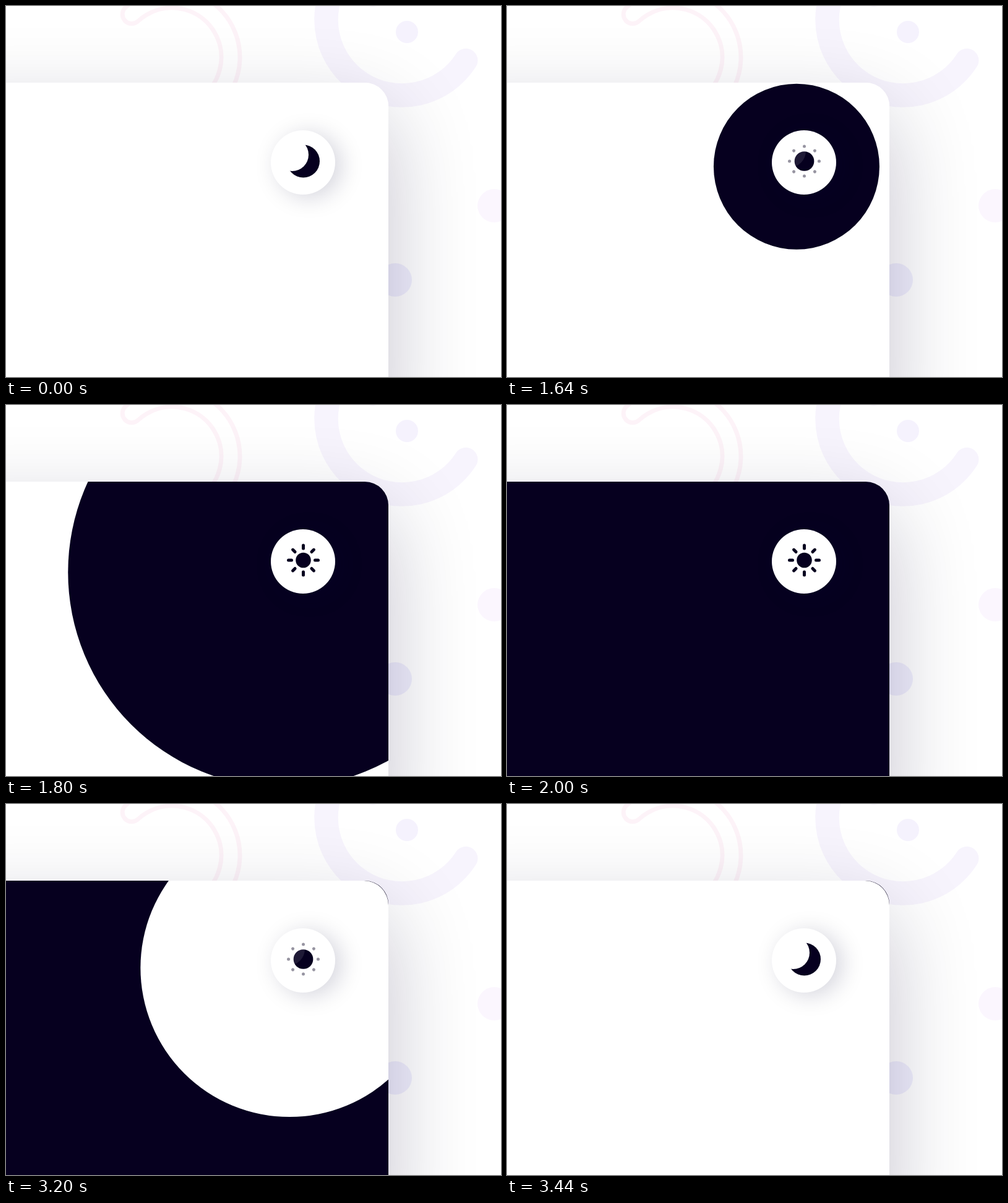
Animation of 800 by 600 pixels, one loop 3480 ms. Source, as an HTML page with a canvas:

```html
<!DOCTYPE html>
<html lang="en">
<head>
<meta charset="utf-8">
<title>Theme switch</title>
<style>
  html, body { margin: 0; width: 100%; height: 100%; overflow: hidden; background: #fff; }
  canvas { display: block; }
</style>
</head>
<body>
<canvas id="stage" width="800" height="600"></canvas>
<script>
const LOOP = 3480, STEP = 40;
const DARK = '#06001f', LIGHT = '#fff';
const TAU = Math.PI * 2, RAD = Math.PI / 180;
const button = { x: 480, y: 253, r: 52 };
const icon = { x: 480.5, y: 251 };
const ctx = document.getElementById('stage').getContext('2d');

const clamp = v => Math.min(1, Math.max(0, v));
const ramp = (t, start, length) => clamp((t - start) / length);

// Piecewise linear value through [x, y] points.
function curve(x, points) {
  for (let i = 1; i < points.length; i++) {
    const [x0, y0] = points[i - 1], [x1, y1] = points[i];
    if (x <= x1) return y0 + (y1 - y0) * (x - x0) / (x1 - x0);
  }
  return points[points.length - 1][1];
}

function disc(c, x, y, r, color) {
  c.beginPath();
  c.arc(x, y, r, 0, TAU);
  c.fillStyle = color;
  c.fill();
}

function cardPath(c, radius) {
  c.beginPath();
  c.roundRect(-700, 124, 1318, 1200, radius);
}

function makeBackdrop() {
  const layer = document.createElement('canvas');
  layer.width = 800;
  layer.height = 600;
  const c = layer.getContext('2d');
  c.fillStyle = LIGHT;
  c.fillRect(0, 0, 800, 600);

  // Broad open ring
  c.lineCap = 'round';
  c.lineWidth = 38.5;
  c.strokeStyle = 'rgba(110,60,220,0.055)';
  c.beginPath();
  c.arc(640, 22, 122.5, 32.6 * RAD, 230 * RAD);
  c.stroke();

  // Outlined hook
  c.lineWidth = 7;
  c.strokeStyle = 'rgba(225,85,155,0.065)';
  const turn = 227 * RAD;
  c.beginPath();
  c.arc(268, 83, 80, 60 * RAD, turn, true);
  c.arc(268 + 95 * Math.cos(turn), 83 + 95 * Math.sin(turn), 15, turn - Math.PI, turn);
  c.arc(268, 83, 110, turn, 420 * RAD);
  c.stroke();

  disc(c, 593, -17, 18, 'rgba(110,60,220,0.06)');
  disc(c, 648, 42, 18, 'rgba(100,60,220,0.065)');
  disc(c, 789, 323, 27, 'rgba(150,50,220,0.045)');
  disc(c, 629, 443, 27, 'rgba(70,60,220,0.08)');

  c.shadowColor = 'rgba(12,0,50,0.24)';
  c.shadowBlur = 140;
  c.shadowOffsetY = 52;
  cardPath(c, 38);
  c.fillStyle = LIGHT;
  c.fill();
  return layer;
}

function drawCard(base, wash, radius) {
  cardPath(ctx, 38);
  ctx.fillStyle = base;
  ctx.fill();
  if (radius <= 0) return;
  ctx.save();
  cardPath(ctx, base === DARK ? 39.5 : 38);
  ctx.clip();
  // The centre drifts toward the middle of the card as the wash grows.
  disc(ctx, button.x - radius * 0.09, button.y + radius * 0.05, radius, wash);
  ctx.restore();
}

function drawButton() {
  ctx.save();
  ctx.shadowColor = 'rgba(6,0,55,0.17)';
  ctx.shadowBlur = 36;
  ctx.shadowOffsetX = 10;
  ctx.shadowOffsetY = 5;
  disc(ctx, button.x, button.y, button.r, LIGHT);
  ctx.restore();
}

// moon: 0 = sun, 1 = crescent
function drawIcon(moon) {
  ctx.save();
  ctx.translate(icon.x, icon.y);

  ctx.globalAlpha = curve(moon, [[0, 1], [0.25, 0.42], [0.85, 0.3], [1, 0]]);
  ctx.strokeStyle = DARK;
  ctx.lineWidth = 5;
  ctx.lineCap = 'round';
  const inner = curve(moon, [[0, 19], [0.25, 23.9], [1, 23.9]]);
  for (let i = 0; i < 8; i++) {
    const cos = Math.cos(i * TAU / 8), sin = Math.sin(i * TAU / 8);
    ctx.beginPath();
    ctx.moveTo(cos * inner, sin * inner);
    ctx.lineTo(cos * 24, sin * 24);
    ctx.stroke();
  }

  ctx.globalAlpha = 1;
  const r = 12.3 + 14.2 * moon;
  disc(ctx, 0, 0, r, DARK);

  const alpha = curve(moon, [[0, 0], [0.25, 0.1], [0.85, 0.4], [1, 1]]);
  if (alpha > 0) {
    const shift = curve(moon, [[0, 6], [0.25, 6], [0.85, 3.5], [1, 0]]);
    ctx.beginPath();
    ctx.arc(0, 0, r + 1, 0, TAU);
    ctx.clip();
    ctx.globalAlpha = alpha;
    disc(ctx, -18 - shift, -10.5 - shift, 26.5, LIGHT);
  }
  ctx.restore();
}

const backdrop = makeBackdrop();

function draw(time) {
  const t = Math.floor(time % LOOP / STEP) * STEP;
  ctx.drawImage(backdrop, 0, 0);

  if (t < 2000) drawCard(LIGHT, DARK, 1.34 * (t - 1540));
  else drawCard(DARK, LIGHT, 1.506 * (t - 3040));

  drawButton();
  const moon = t < 1520 ? 1
    : t < 2000 ? 1 - ramp(t, 1490, 200)
    : ramp(t, 3140, 240);
  drawIcon(moon);
}

const start = performance.now();
function tick() {
  draw(performance.now() - start);
  requestAnimationFrame(tick);
}
tick();
</script>
</body>
</html>
```
